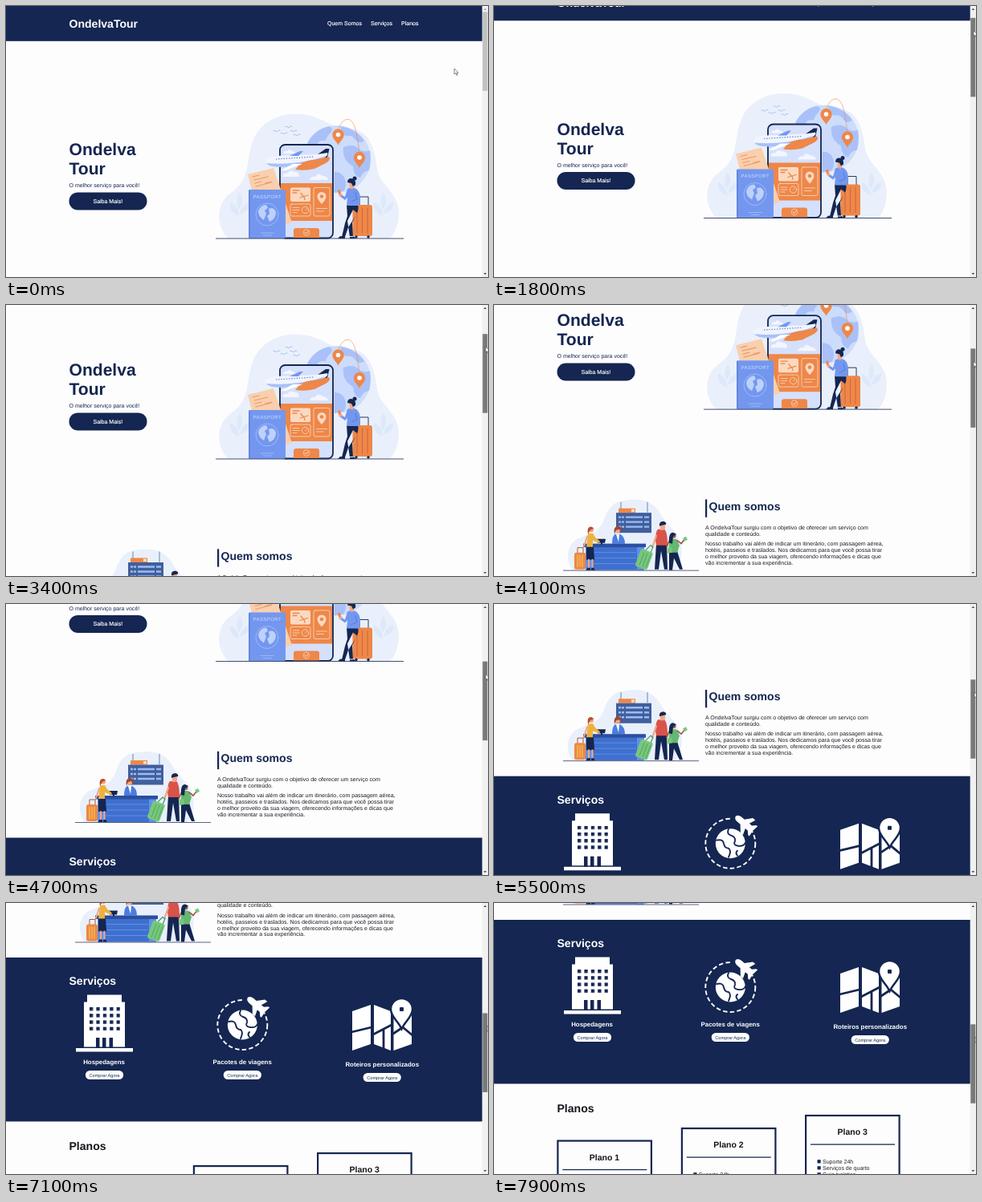
An HTML page that plays this animation: 600 px wide and 338 px high, repeating every 8 s.

```html
<!DOCTYPE html>
<html lang="pt-BR">
<head>
<meta charset="utf-8">
<title>Ondelva Tour</title>
<style>
@property --y { syntax: "<number>"; inherits: true; initial-value: 0; }
@property --cx { syntax: "<number>"; inherits: true; initial-value: 558; }
@property --cy { syntax: "<number>"; inherits: true; initial-value: 78; }
html, body { margin: 0; width: 100%; height: 100%; overflow: hidden; background: #fefdfe; }
svg { display: block; width: 100%; height: 100%; }
#stage {
  --navy: #142651; --orange: #ee8748; --peach: #fbd9c0; --blue: #7397ef; --pale: #e9f0fb;
  font: 7.03px "Liberation Sans", Arial, sans-serif;
  text-rendering: geometricPrecision;
  animation: scroll 8s infinite, pointer 8s infinite;
}
#page { transform: translateY(calc(var(--y) * -1px)); }
#thumb { transform: translateY(calc(var(--y) * .2945px)); animation: press 8s step-end infinite; }
#up { animation: enable 8s step-end infinite; }
#cursor { transform: translate(calc(var(--cx) * 1px), calc((var(--cy) + var(--y) * .2945) * 1px)); }
.h { font-weight: 700; font-size: 14.05px; }
.big { font-weight: 700; font-size: 21.08px; }
.h3 { font-weight: 700; font-size: 7.9px; }
.h2 { font-weight: 700; font-size: 10.5px; }
.btn { font-size: 5.6px; }
.m { text-anchor: middle; }
.navy { fill: var(--navy); }
.or { fill: var(--orange); }
.peach { fill: var(--peach); }
.blue { fill: var(--blue); }
.pale { fill: var(--pale); }
.w { fill: #fff; }
.firm { stroke: #fff; stroke-width: .16; }
.skin { fill: #f3a785; }
.ln { fill: none; stroke-linecap: round; stroke-linejoin: round; }
/* Each step lasts 100 ms. */
@keyframes scroll {
  0%, 12.5% { --y: 0; animation-timing-function: steps(8); }
  22.5% { --y: 25.5; animation-timing-function: steps(9); }
  33.75% { --y: 55; animation-timing-function: steps(7); }
  42.5% { --y: 98; animation-timing-function: steps(2); }
  45% { --y: 111; animation-timing-function: steps(11); }
  58.75% { --y: 218.5; animation-timing-function: steps(15); }
  77.5% { --y: 362.5; animation-timing-function: steps(9); }
  88.75% { --y: 442; animation-timing-function: steps(8); }
  98.75%, 100% { --y: 489; }
}
@keyframes pointer {
  0% { --cx: 558; --cy: 78; animation-timing-function: steps(8); }
  10% { --cx: 597; --cy: 23; }
  58.75% { --cx: 597; --cy: 23; animation-timing-function: steps(15); }
  77.5%, 100% { --cx: 599; --cy: 23; }
}
@keyframes press {
  0% { fill: #c1c1c1; }
  10% { fill: #a8a8a8; }
  11.25%, 100% { fill: #7a7a7a; }
}
@keyframes enable {
  0% { fill: #a3a3a3; }
  13.75%, 100% { fill: #505050; }
}
</style>
</head>
<body>
<svg id="stage" viewBox="0 0 600 338" preserveAspectRatio="none">
  <defs>
    <pattern id="windows" x="104" y="130" width="8.4" height="8.2" patternUnits="userSpaceOnUse">
      <rect width="4.3" height="4.3" class="navy"/>
    </pattern>
    <g id="pin">
      <path class="or" d="M0 12C-2 7.500-7.200 4-7.200-1a7.200 7.200 0 0 1 14.400 0C7.200 4 2 7.500 0 12z"/>
      <circle class="w" cy="-1" r="2.800"/>
    </g>
    <path id="bird" class="ln" stroke="#8fadf3" stroke-width=".7" d="M-4-1.500q3-.5 4 1.500q1-2.500 4-2"/>
    <g id="leaf" fill="#dde8fa">
      <path d="M0 0q-13-5-11-17q11 5 11 17zM0-8q-6-11 1-21q7 10-1 21zM1-3q2-12 12-14q1 11-12 14z"/>
    </g>
    <g id="buy">
      <rect class="w" x="-23.600" width="47.200" height="11" rx="5.500"/>
      <text class="btn navy m" y="7.500">Comprar Agora</text>
    </g>
    <g id="card">
      <rect x="1.100" y="1.100" width="116.500" height="170" fill="none" stroke="#142651" stroke-width="2.200"/>
      <path d="M7 37.200h105" stroke="#142651" stroke-width="1.300"/>
      <path class="navy" d="M15.500 56.200h4.200v4.200h-4.200zM15.500 64.200h4.200v4.200h-4.200zM15.500 72.200h4.200v4.200h-4.200z"/>
      <g fill="#222">
        <text x="22" y="60.800">Suporte 24h</text>
        <text x="22" y="68.800">Serviços de quarto</text>
        <text x="22" y="76.800">Guia turístico</text>
      </g>
    </g>
  </defs>

  <rect width="600" height="338" fill="#fefdfe"/>
  <g id="page">
    <!-- header -->
    <rect class="navy" width="593" height="43.800"/>
    <g class="w">
      <text class="h" x="78.500" y="26.800">OndelvaTour</text>
      <g class="firm">
        <text x="400" y="24.100">Quem Somos</text>
        <text x="454" y="24.100">Serviços</text>
        <text x="492" y="24.100">Planos</text>
      </g>
    </g>

    <!-- hero -->
    <g class="navy">
      <text class="big" x="78.500" y="186">Ondelva</text>
      <text class="big" x="78.500" y="210.200">Tour</text>
      <text x="78.500" y="226">O melhor serviço para você!</text>
      <rect x="78.500" y="232.400" width="97" height="22" rx="11"/>
    </g>
    <text class="w firm m" x="126.800" y="245.600">Saiba Mais!</text>

    <path class="pale" d="M277 290C260 274 262 246 279 234C305 216 298 196 306 172C315 142 346 130 375 136C396 140 402 151 424 152C455 154 459 180 462 203C465 224 489 232 489 258Q489 278 478 290z"/>
    <use href="#leaf" x="290" y="262"/>
    <use href="#leaf" x="469" y="262"/>
    <!-- globe -->
    <circle cx="412" cy="191" r="42" fill="#cddcfb"/>
    <path fill="#a9c1f8" d="M375 171q9-17 27-21q7 3 2 8t-6 10q-9-1-11 5t-12-2zM416 150q20 3 30 18q-7 5-11-1t-10-5t-9-12zM420 176q13-5 20 3q7 4 13 1q2 12-1 25q-8 1-11 9q-8-1-9-14q-14-8-12-24zM409 207q10 0 13 9t-2 15l-11 2z"/>
    <path class="ln" stroke="#ee8748" stroke-width=".6" stroke-dasharray="1.500 .7" d="M414 153Q419 140 427 141.500Q436 144 439.500 181"/>
    <use href="#pin" x="413.500" y="161.500"/>
    <use href="#pin" x="440" y="190"/>
    <use href="#bird" x="337" y="157"/><use href="#bird" x="346" y="160"/><use href="#bird" x="352" y="152"/>
    <use href="#bird" x="358" y="157"/><use href="#bird" x="362" y="162"/>
    <!-- phone -->
    <rect x="341" y="173" width="66" height="117" rx="6.500" fill="#d5e0fc"/>
    <path fill="#f3f6fe" d="M344 213q1-5 6-4q3-6 9-2q6-1 6 6zM378 217q2-5 7-4q3-6 9-1q6 0 7 5zM345 184q1-4 5-3q3-4 6 0q4 0 4 3z"/>
    <path class="or" d="M342 221h64v47h-64z"/>
    <rect x="341" y="173" width="66" height="116.500" rx="6.500" fill="none" stroke="#142651" stroke-width="1.800"/>
    <rect class="peach" x="354" y="226.500" width="25" height="17.500" rx="2"/>
    <g class="ln" stroke="#fbdcc6" stroke-width=".8">
      <rect x="383" y="226.500" width="20" height="35.500" rx="2"/>
      <rect x="354" y="247" width="25" height="15" rx="2"/>
      <circle cx="372.500" cy="254.500" r="4.200"/>
      <path d="M372.500 254.500l2-2M357 251.500h8M357 254.500h8M357 257.500h5M386.500 252.500h13M386.500 256h9"/>
    </g>
    <path class="ln" stroke="#ee8748" stroke-width="1.300" d="M366 239l10-3M370 237.500l-3-4M371 237.500l1 4M357 230h8M357 233h5"/>
    <path class="peach" d="M393 247q-5.500-6-5.500-9.500a5.500 5.500 0 0 1 11 0q0 3.500-5.500 9.500z"/>
    <circle class="or" cx="393" cy="237.500" r="2.300"/>
    <path class="or" d="M358 289v-9q0-3 3-3h26q3 0 3 3v9z"/>
    <circle cx="374" cy="282.500" r="3.800" fill="none" stroke="#fbdcc6" stroke-width=".7"/>
    <path class="ln" stroke="#fff" stroke-width=".8" d="M372 282.500l1.500 1.500 2.700-3"/>
    <!-- airliner -->
    <path class="navy" d="M385 187l13-9h4.500l-3 13z"/>
    <path fill="#f1f4fd" d="M323 192q4-4 13-5l50-2q9-1 14-2q2 3-5 7q-20 9-49 10q-15 1-21-3q-3-2-2-5z"/>
    <path fill="#a9c1f8" d="M324 196q20 2 40-1t34-8q-10 9-32 12q-37 5-42-3z"/>
    <path class="or" d="M366 197q9-5 18-5l18-4q3 4-4 8l-14 7q-12 3-24 1z"/>
    <path class="w" d="M357 197h12l-21 8h-6z"/>
    <path class="blue" d="M353 187l13-6h4l-6 6z"/>
    <path stroke="#5f82d4" stroke-width="1.200" stroke-dasharray="1.400 1.800" d="M336 191l48-3"/>
    <!-- ticket and passport -->
    <path fill="#f9cfae" d="M301 210l32-8 23 68-12 4-38-44z"/>
    <path class="ln" stroke="#e99c68" stroke-width="1.200" d="M307 213l8-2M309 217l17-4M310 221l8-2M323 221l8-2M311 225l19-5"/>
    <rect class="blue" x="302" y="229" width="46" height="61" rx="2"/>
    <path fill="#6485de" d="M302 231q0-2 2-2v61q-2 0-2-2z"/>
    <text class="m" x="325.300" y="239.800" font-size="6" letter-spacing=".45" fill="#cfdefc">PASSPORT</text>
    <g class="ln" stroke="#a9c1f8" stroke-width=".8">
      <circle cx="325" cy="260" r="14"/>
      <path d="M317 283h16M320 286h10"/>
    </g>
    <path fill="#bdd1fb" d="M314 256q3-8 10-8l2 4-4 3 2 4-3 8q-7-4-7-11zM327 253q6-3 9 4q0 9-8 12l-3-7 3-3z"/>
    <!-- traveller -->
    <path class="ln" stroke="#142651" stroke-width=".9" d="M440 249v-11h11v11"/>
    <rect class="or" x="431.500" y="248" width="24.500" height="39" rx="3"/>
    <path class="ln" stroke="#c9653a" stroke-width=".9" d="M437 252v31M443.500 252v31M450 252v31"/>
    <circle class="navy" cx="436" cy="288" r="1.700"/><circle class="navy" cx="451" cy="288" r="1.700"/>
    <path class="navy" d="M424 248h14q2 6-3 14l-9 14-4 12h-4l4-17 3-9zM432 254l-7 14 3 20h4l-1-18 6-12zM416 287l6 1v2h-9zM428 287h4l4 3h-8z"/>
    <path class="blue" d="M425 228q6-3 11 0q5 4 5 12l-2 9h-15l1-10-3 3-7-5 2-2 5 3z"/>
    <path class="ln" stroke="#4f74cf" stroke-width=".8" d="M435 233l2 8-7 3"/>
    <path class="skin" d="M427 219h6v7l-2 3-3-2zM416 233l3 2-2 3-3-2z"/>
    <path class="or" d="M413 230l3-1 1 5-3 1z"/>
    <path class="navy" d="M425 220q0-5 5-5q6 1 5 8l-3 2-2-4z"/>
    <circle class="navy" cx="434" cy="215" r="2.500"/>
    <path d="M261 290h234" stroke="#2e3c60" stroke-width=".9"/>

    <!-- about -->
    <rect class="navy" x="263" y="402.300" width="2.200" height="22.300"/>
    <text class="h navy" x="267.500" y="415.600">Quem somos</text>
    <g fill="#1b1c22">
      <text x="263" y="439.500">A OndelvaTour surgiu com o objetivo de oferecer um serviço com</text>
      <text x="263" y="447.400">qualidade e conteúdo.</text>
      <text x="263" y="459.800">Nosso trabalho vai além de indicar um itinerário, com passagem aérea,</text>
      <text x="263" y="467.700">hotéis, passeios e traslados. Nos dedicamos para que você possa tirar</text>
      <text x="263" y="475.600">o melhor proveito da sua viagem, oferecendo informações e dicas que</text>
      <text x="263" y="483.400">vão incrementar a sua experiência.</text>
    </g>
    <g transform="translate(0 218.500)">
      <path class="pale" d="M98 272C87 258 91 238 106 232C126 225 130 223 136 211C142 194 148 186 164 185C186 181 200 188 208 203C216 218 229 222 233 240Q236 260 226 272z"/>
      <!-- departures board -->
      <path d="M158 187v13M191 187v13" stroke="#48659f" stroke-width=".8"/>
      <rect class="or" x="155" y="195" width="21" height="5.500"/>
      <rect class="peach" x="171" y="196" width="4" height="3.500"/>
      <rect x="152" y="200.500" width="44" height="25" fill="#405f9c"/>
      <path d="M155 206h38M155 212h38M155 218h38" stroke="#9cbcf5" stroke-width="2.400" stroke-dasharray="3 1 3 2 21 2 6"/>
      <!-- receptionist -->
      <path fill="#4b7de0" d="M147 239q0-10 4-12h6q6 3 6 12z"/>
      <path class="w" d="M152 227h4l-1 10z"/>
      <circle class="skin" cx="154" cy="222" r="3.400"/>
      <path fill="#9c472f" d="M150 227q-2-9 4-10q6 0 4 8l-2-4-4 1z"/>
      <!-- desk -->
      <rect x="114" y="242" width="73" height="30" fill="#3f70cf"/>
      <path fill="#5f91e8" d="M114 242h8v30h-8zM178 242h9v30h-9z"/>
      <rect x="111" y="239" width="78" height="4.500" fill="#2b4f9f"/>
      <path stroke="#6598ed" stroke-width=".8" d="M123 250h54M123 257h54M123 264h54"/>
      <path class="navy" d="M128 233h11l-1 5h-9zM133 238h2v2h-2z"/>
      <!-- left visitor -->
      <path fill="#edb23e" d="M117 226h6l3 5 6 5-1 2-8-3v9h-8z"/>
      <path class="navy" d="M115 243h9l1 16h-10z"/>
      <path class="ln" stroke="#f3a785" stroke-width="2" d="M118 259v11M122.500 259v11M116 230l-4 12"/>
      <path class="navy" d="M116 269h4v3h-5zM121 269h3l2 3h-5z"/>
      <circle class="skin" cx="121" cy="221.500" r="3.200"/>
      <path fill="#b85130" d="M117 227q-2-10 5-9l2 2-4 2z"/>
      <path class="ln" stroke="#b85130" stroke-width="1" d="M104 250v-6h7v6"/>
      <rect class="or" x="100" y="250" width="14" height="21" rx="2.500"/>
      <path d="M104 253v15M107 253v15M110 253v15" stroke="#f8ca4d" stroke-width="1.100"/>
      <!-- couple -->
      <path class="navy" d="M202 239h13l1 32h-4l-4-23-3 23h-5z"/>
      <path fill="#d9534a" d="M204 221h8q4 3 4 20h-14l-1-6q0-11 3-14z"/>
      <path class="ln" stroke="#f3a785" stroke-width="2.200" d="M202 229l-3 9-2 5"/>
      <path class="skin" d="M207 214h6v6l-2 2h-4z"/>
      <path class="navy" d="M206 217q-1-6 5-6q4 1 3 4l-5 1z"/>
      <path class="ln" stroke="#3b9a67" stroke-width="1.200" d="M189 247l6-6 3 2-3 7"/>
      <rect x="-8" y="-11" width="16" height="23" rx="2.500" fill="#79c77a" transform="translate(187 258) rotate(20)"/>
      <path stroke="#4ca567" stroke-width="1" d="M187 250l-6 16M191 251l-6 17M195 253l-6 16"/>
      <path class="navy" d="M218 248h10l7 23h-4l-7-14-2 15h-4z"/>
      <path fill="#65b86f" d="M219 233h8l4 8-3 9h-11l1-10z"/>
      <path class="ln" stroke="#9b5c47" stroke-width="1.700" d="M228 235l5 4 4-5M218 236l-3 7"/>
      <circle cx="223.500" cy="229" r="3" fill="#9b5c47"/>
      <path class="navy" d="M218 238q-1-13 5-13l4 2-4 3-1 9z"/>
      <path fill="#79c77a" d="M235 232l4-2 2 4-4 2zM216 244l5-1 1 7-6 1z"/>
      <path d="M86 272.500h169" stroke="#2e3c60" stroke-width=".8"/>
    </g>

    <!-- services -->
    <rect class="navy" y="510" width="593" height="204.500"/>
    <g class="w">
      <text class="h" x="78.500" y="544.300">Serviços</text>
      <g class="h3 m">
        <text x="122" y="643">Hospedagens</text>
        <text x="294.200" y="643">Pacotes de viagens</text>
        <text x="468.200" y="646">Roteiros personalizados</text>
      </g>
    </g>
    <use href="#buy" x="122.500" y="651"/>
    <use href="#buy" x="294.300" y="651"/>
    <use href="#buy" x="468.200" y="654"/>
    <g transform="translate(0 442)">
      <!-- hotel -->
      <path class="w" d="M101 114.500h43v9h4v56h-51v-56h4zM87 181h71v4.500h-71z"/>
      <rect x="104" y="130" width="38" height="30" fill="url(#windows)"/>
      <path class="navy" d="M112 168h4.500v13h-4.500zM120 168h4.500v13h-4.500zM128.500 168h4.500v13h-4.500z"/>
      <!-- world trip -->
      <circle cx="294.300" cy="152" r="31" fill="none" stroke="#fff" stroke-width="1.900" stroke-dasharray="5.500 3.240"/>
      <circle class="w" cx="294.300" cy="152" r="18.500"/>
      <path class="ln" stroke="#142651" stroke-width="1.900" d="M277 148q8-2 9 4t6 6q4 3 0 11M292 134q-3 6 3 8t5 7q-3 5 4 6t9-4M303 161q-3 3 0 6"/>
      <g transform="translate(311.500 127) rotate(40)">
        <rect x="-16" y="-8" width="30" height="16" class="navy"/>
        <path class="w" d="M-14 0q1-4 6-4h5l7-8h4l-3 8h4l4-4h2l-1 8 1 8h-2l-4-4h-4l3 8h-4l-7-8h-5q-5 0-6-4z"/>
      </g>
      <!-- route map -->
      <path class="w" d="M431 135l23-8v49l-23 8zM458 127l21 8v49l-21-8zM482.500 135l22.500-8v49l-22.500 8z"/>
      <path class="ln" stroke="#142651" stroke-width="2.800" d="M430 161l25-6M457 164l23-12M470 159v23M482 163l12-8 12 10"/>
      <path class="w" stroke="#142651" stroke-width="2.500" d="M492.500 157C488 147 479 142 479 132.500a13.500 13.500 0 0 1 27 0C506 142 497 147 492.500 157z"/>
      <rect class="navy" x="490" y="130" width="5" height="5" rx="1"/>
    </g>

    <!-- plans -->
    <text class="h" x="78.500" y="749.500" fill="#15161c">Planos</text>
    <use href="#card" x="78.300" y="784.500"/>
    <use href="#card" x="232.800" y="769"/>
    <use href="#card" x="387" y="753"/>
    <g class="h2 m" fill="#15161c">
      <text x="137.500" y="809.800">Plano 1</text>
      <text x="292" y="794.300">Plano 2</text>
      <text x="446.200" y="778.300">Plano 3</text>
    </g>
  </g>

  <!-- scrollbar -->
  <rect x="592.700" width="7.300" height="338" fill="#f1f1f1"/>
  <path id="up" d="M594.500 5l1.900-2.200 1.900 2.200z"/>
  <path fill="#505050" d="M594.500 333l1.900 2.200 1.900-2.200z"/>
  <rect id="thumb" x="593.300" y="7.300" width="6" height="98.500"/>
  <path id="cursor" fill="#fff" stroke="#3c3c3c" stroke-width=".6" d="M0 0v7.200l1.700-1.500 1.200 2.700 1.200-.5-1.200-2.600h2.200z"/>
</svg>
</body>
</html>
```
